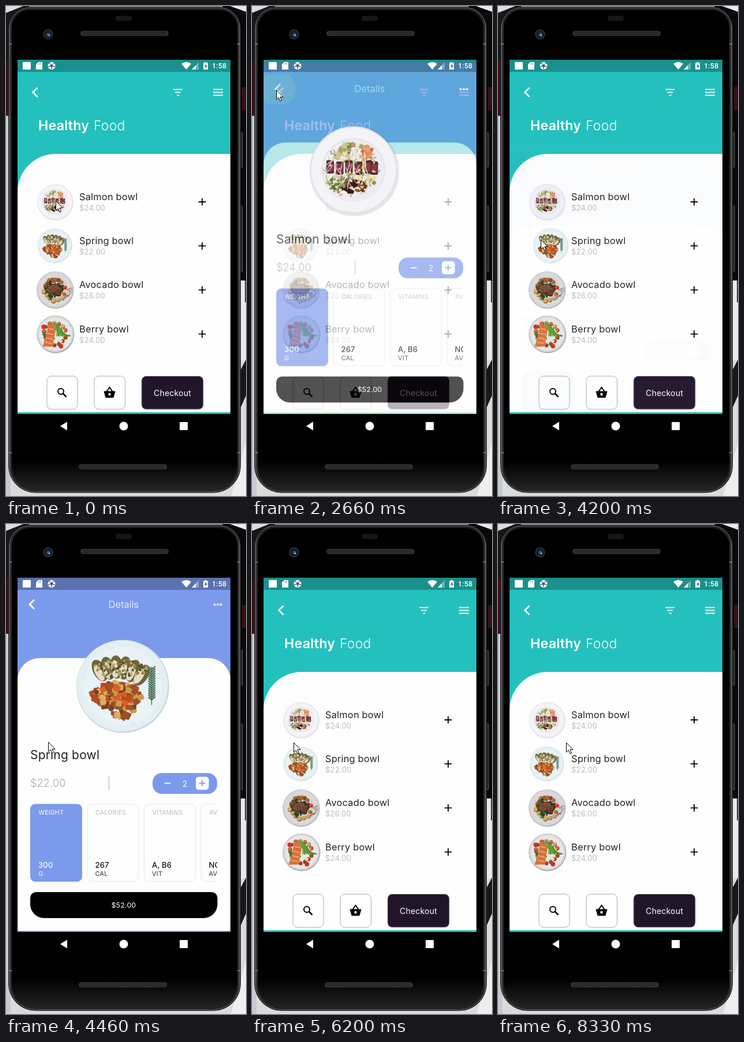
Recreate the animation shown at these times as an HTML page. Size 416 by 848 pixels, loop 8.73 s.

```html
<!DOCTYPE html>
<html lang="en">
<head>
<meta charset="utf-8">
<title>Food app</title>
<style>
  html, body { margin: 0; width: 100%; height: 100%; overflow: hidden; background: #ddd; }
  svg { display: block; width: 100%; height: 100%; }
  text { font-family: Inter, "Open Sans", sans-serif; letter-spacing: .2px; }
</style>
</head>
<body>
<svg id="stage" viewBox="0 0 416 848"></svg>
<script>
const LOOP = 8730, STEP = 200 / 3, DURATION = 300;
const TEAL = '#24c0bd', BLUE = '#7c9aec';
const stage = document.getElementById('stage');

// ---- SVG helpers ----
const rect = (x, y, w, h, fill, r = 0, extra = '') =>
  `<rect x="${x}" y="${y}" width="${w}" height="${h}" rx="${r}" fill="${fill}" ${extra}/>`;
const circle = (x, y, r, fill, extra = '') => `<circle cx="${x}" cy="${y}" r="${r}" fill="${fill}" ${extra}/>`;
const shape = (d, fill, extra = '') => `<path d="${d}" fill="${fill}" ${extra}/>`;
const line = (d, color, width = 2, extra = '') =>
  `<path d="${d}" fill="none" stroke="${color}" stroke-width="${width}" ${extra}/>`;
const text = (s, x, y, size, fill, weight = 400, anchor = 'start') =>
  `<text x="${x}" y="${y}" font-size="${size}" fill="${fill}" font-weight="${weight}" text-anchor="${anchor}">${s}</text>`;
const plus = (x, y, r, color) => line(`M${x - r} ${y}h${2 * r}M${x} ${y - r}v${2 * r}`, color, 1.8);
const outline = 'stroke="#aaa" stroke-width="1"';

// ---- Dishes, drawn on a plate of radius 100 ----
let seed = 7;
const random = () => (seed = (seed * 16807) % 2147483647) / 2147483647;
const pick = list => list[Math.floor(random() * list.length)];

function scatter(n, cx, cy, rx, ry, colors, w, h = w, round = w / 4) {
  let out = '';
  for (let i = 0; i < n; i++) {
    const a = random() * 6.283, d = Math.sqrt(random());
    const x = (cx + Math.cos(a) * rx * d).toFixed(1), y = (cy + Math.sin(a) * ry * d).toFixed(1);
    const k = .7 + random() * .6;
    out += rect(-w * k / 2, -h * k / 2, w * k, h * k, pick(colors), round,
      `transform="translate(${x} ${y}) rotate(${Math.floor(random() * 180)})"`);
  }
  return out;
}

function ring(n, r, from, to, colors, size) {
  let out = '';
  for (let i = 0; i < n; i++) {
    const a = (from + (to - from) * i / (n - 1)) * Math.PI / 180, d = r + random() * 10 - 5;
    const x = Math.cos(a) * d, y = Math.sin(a) * d, s = size * (.85 + random() * .3);
    out += circle(x, y, s, '#6b3f1c') + circle(x - 1, y - 1.5, s * .85, pick(colors));
  }
  return out;
}

function rosemary(x, y, height) {
  let d = '';
  for (let i = 0; i < height; i += 5) d += `M${x} ${y + i}l-7 -6M${x} ${y + i}l8 -7`;
  return line(`M${x} ${y - 6}v${height + 12}`, '#5f6f4c', 2) + line(d, '#4d7259', 3);
}

function salmonDish() {
  let out = circle(2, 3, 103, '#00000018') + circle(0, 0, 100, '#e3e3ea') + circle(0, 0, 97, '#f3f3f8') +
    circle(0, 0, 73, '#e6e5ec') + circle(0, 2, 70, '#eeedf2');
  out += scatter(300, -5, 0, 64, 62, ['#fff', '#efe6da', '#d9cdbb', '#c4b8a0', '#b5ad83'], 8, 3);
  out += scatter(60, 0, -36, 42, 24, ['#a5a957', '#cdc68c', '#7a8d45', '#e9e2d0', '#b99a72'], 8);
  out += scatter(35, 22, 16, 32, 26, ['#dcc95f', '#a0b04f', '#ebe0ad', '#8a9a48'], 10);
  out += scatter(16, 27, -42, 16, 14, ['#e58458', '#ee9d74', '#d9683f'], 11);
  [-62, -40, -19, 3, 26, 39].forEach((x, i) => {
    out += rect(x, -22 + i % 2 * 3, 17, 30, '#4b2a2a', 3) + rect(x + 2, -17 + i % 2 * 3, 13, 21, '#8b3a45', 2);
  });
  out += scatter(24, -8, 38, 36, 14, ['#3f1d14', '#6b3a20', '#94592e'], 15, 8);
  out += scatter(40, -38, 33, 22, 20, ['#5f7f3c', '#8da050', '#d9cdb5'], 6);
  for (let i = 0; i < 26; i++) {
    const x = random() * 90 - 55, y = random() * 60 - 45;
    out += line(`M${x} ${y}q${random() * 30 - 15} 10 ${random() * 36 - 18} ${20 + random() * 14}`, pick(['#f6eeee', '#e5c6cd', '#d3a5b3']), 1.6);
  }
  return out + scatter(50, -2, 3, 55, 50, ['#f4ece4', '#d8cdb8'], 4);
}

function springDish() {
  let out = circle(0, 0, 100, '#c9d8df') + circle(-1, -1, 98, '#e4eff4') + circle(0, 0, 84, '#e9f3f7');
  out += scatter(50, 0, 0, 88, 88, ['#c2d2da', '#d5e2e8'], 2);
  const cubes = ['#d95f28', '#cf9a4c', '#9a522a', '#dcae62', '#bf4a22', '#7b4222'];
  out += scatter(45, -13, 18, 50, 24, ['#6f3c20', '#8e4e28'], 13);
  out += scatter(110, -13, 20, 54, 26, cubes, 12) + scatter(30, -3, 50, 34, 17, cubes, 12);
  for (let i = 0; i < 6; i++) {
    out += `<g transform="translate(${-50 + i * 18} ${-34 - Math.sin(i / 5 * 3.14) * 12 + i * 2}) rotate(${-28 + i * 12})">` +
      `<ellipse rx="14" ry="25" fill="#6f6539"/><ellipse cx="-3" cy="4" rx="8.5" ry="19" fill="#e6dbc5"/></g>`;
  }
  out += scatter(110, -6, -38, 58, 20, ['#6d6838', '#94854a', '#504b28', '#b3a36c'], 5);
  return out + rosemary(62, -36, 70);
}

function avocadoDish() {
  let out = circle(1, 2, 100, '#999') + circle(0, 0, 99, '#d0ced0') + circle(0, 0, 92, '#dad8da') + circle(0, 0, 70, '#d0ced0');
  out += ring(9, 54, 165, 310, ['#9a602b', '#ad7035', '#85481f'], 12);
  out += ring(7, 57, 25, 170, ['#c8923f', '#ba8138', '#d8aa55'], 11.5);
  out += scatter(40, -6, 2, 50, 46, ['#35592a', '#4d7035', '#274b24', '#20371d'], 22, 11, 6);
  out += shape('M-50 0Q-40-30-5-32Q35-34 42-12Q38 4 30 34Q4 42-16 20Q-44 24-50 0Z', '#472a20');
  out += shape('M-46-2Q-35-26-5-28Q22-28 20-14Q4 12-16 16Q-42 18-46-2Z', '#83543f');
  out += shape('M0 16Q14-20 38-11Q33 14 26 28Q8 32 0 16Z', '#70422f');
  out += scatter(60, -10, -6, 34, 17, ['#9a6a52', '#6b3f2e', '#a87860', '#593325'], 7, 2.5);
  out += line('M-35-5l48-17M-30 5l45-18M-20 12l30-15M10 18l20-22M15 25l15-16', '#462318', 2);
  out += circle(55, -11, 10, '#d72a18') + circle(52, -14, 3, '#f58267');
  out += line('M62 0l32 -6M67 4l24 14M70 0l18 -14M75 6l20 0', '#56633a', 2.5);
  return out + line('M55 48q15-28 13-14q2 10 12-17M50 42q9-8 9-23', '#8c3c1d', 3.5);
}

function berryDish() {
  let out = circle(1, 2, 100, '#999') + circle(0, 0, 98, '#d3d3d6') + circle(0, 0, 89, '#e6e6e8');
  out += ring(14, 58, 20, 340, ['#c23820', '#dd6534', '#d9ae58', '#8e4a27'], 11);
  out += scatter(28, -8, 5, 54, 52, ['#d6a256', '#cc4728', '#4c742f', '#efdcad'], 15);
  out += shape('M-38-43L-5-52L0-10L-16 68L-68 68L-52 20Z', '#d7713f');
  out += line('M-35-28l30 5M-44-4l36 8M-50 20l38 8M-56 44l38 7', '#f1ad79', 5);
  for (let i = 0; i < 8; i++) out += line(`M${-12 + i * 6} ${-62 + i * 5}q${30 - i * 3} 35 ${20 + i * 4} ${72 - i * 5}`, i % 2 ? '#4c8a2e' : '#74ae42', 8, 'stroke-linecap="round"');
  return out + circle(-62, -38, 12, '#cf3522') + circle(30, 65, 12, '#c73420');
}

// Resting places: [x, y, radius] in the list and on the details page.
const dishes = [
  { name: 'Salmon bowl', price: '$24.00', draw: salmonDish, small: [85, 339, 30.5], large: [205, 282, 78.5] },
  { name: 'Spring bowl', price: '$22.00', draw: springDish, small: [84.5, 415, 30], large: [202.5, 281, 80.5] },
  { name: 'Avocado bowl', price: '$26.00', draw: avocadoDish, small: [85, 491, 32], large: [205, 280, 85] },
  { name: 'Berry bowl', price: '$24.00', draw: berryDish, small: [85.5, 567.5, 32.5], large: [205, 281, 85] }
];
const place = ([x, y, r]) => `translate(${x} ${y}) scale(${r / 100})`;

// ---- Pages ----
function listPage() {
  const rows = dishes.map((dish, i) => {
    const y = 339 + i * 76.2;
    return `<use id="plate${i}" href="#dish${i}" transform="${place(dish.small)}"/>` +
      text(dish.name, 127, y - 3, 16.4, '#222') + text(dish.price, 127, y + 15, 13.2, '#aaa', 300) + plus(340, y, 6.3, '#000');
  }).join('');
  return rect(20, 93, 369, 613, TEAL) + shape('M20 703V322A66 66 0 0 1 86 256H389V703Z', '#fefefe') +
    line('M54.5 141.5l-8 7.8l8 7.8', '#fff', 2.7) +
    line('M290 144.5h16M293 149.5h10M296.500 154.500h4M359 144.500h17M359 149.500h17M359 154.500h17', '#e8f8f8', 1.9) +
    text('Healthy', 56, 215, 23.2, '#fff', 600) + text('Food', 152, 215, 23, '#fff', 300) + rows +
    rect(71, 640.5, 53, 57.5, '#fff', 8, outline) + rect(153, 640.5, 53.5, 57.5, '#fff', 8, outline) +
    rect(235, 640.5, 107, 57.5, '#22152a', 8, outline) + text('Checkout', 288.5, 674.5, 14, '#fff', 400, 'middle') +
    circle(95, 667, 5, 'none', 'stroke="#000" stroke-width="2"') + line('M98.500 670.500l6 6', '#000', 2.5) +
    shape('M170 667h19l-3 10.500h-13Z', '#000', 'stroke="#000" stroke-linejoin="round"') +
    line('M174.500 667l5-7l5 7', '#000', 2) + circle(179.500, 672, 2.200, '#fff');
}

function detailsPage() {
  const cards = [['WEIGHT', '300', 'G'], ['CALORIES', '267', 'CAL'], ['VITAMINS', 'A, B6', 'VIT'], ['AVAILABLE', 'NO', 'AV']]
    .map(([label, value, unit], i) => {
      const x = 42.5 + i * 98.5, on = i === 0;
      return rect(x, 485, 89, 133.5, on ? BLUE : '#fefefe', 8, `stroke="${on ? BLUE : '#e6e6e6'}"`) +
        text(label, x + 14, 503, 10.6, on ? '#fff' : '#bbb') +
        text(value, x + 13.5, 595, 13, on ? '#fff' : '#111', 500) + text(unit, x + 13.5, 608.5, 11, on ? '#fff' : '#333');
    }).join('');
  return rect(20, 93, 369, 613, BLUE) + shape('M20 704V270A38 38 0 0 1 58 232H351A38 38 0 0 1 389 270V704Z', '#fefefe') +
    `<g clip-path="url(#bar)">${circle(45, 139, 31, '#c8c8c8', 'id="ripple"')}</g>` +
    line('M49 131l-8 8l8 8', '#fff', 3) + text('Details', 204, 145, 16.5, '#fff', 300, 'middle') +
    [361.5, 367, 372.5].map(x => circle(x, 139.5, 2, '#fff')).join('') +
    `<g id="name">${text('', 42, 407, 21, '#222')}</g><g id="price">${text('', 42, 455, 18, '#aaa', 300)}</g>` +
    line('M178.500 437v23', '#aaa', 1) + rect(254, 431, 112, 36, BLUE, 16) + line('M274.500 448.700h11', '#fff', 1.800) +
    text('2', 310, 454.5, 14, '#fff', 400, 'middle') + rect(329, 437.5, 22.5, 22.5, '#fff', 5) + plus(340, 448.7, 5.5, BLUE) +
    `<g clip-path="url(#cards)">${cards}</g>` +
    shape('M52 637H356.500A10 10 0 0 1 366.500 647V658A24 24 0 0 1 342.500 682H66A24 24 0 0 1 42 658V647A10 10 0 0 1 52 637Z', '#000') +
    text('$52.00', 204, 664, 12.3, '#fff', 400, 'middle');
}

const statusBar = rect(20, 93, 369, 21, '#000', 0, 'fill-opacity=".26"') + rect(29, 97, 14, 13, '#fff', 1) +
  shape('M56 97h7v13h-11v-9Z', '#fff') + line('M57 98.500v3M59.500 98.500v3', '#777', 1) +
  circle(79, 103.5, 6.5, '#fff') + circle(79, 103.5, 2.4, '#456') +
  line('M75 99l2 2M83 99l-2 2M79 106v3M73.500 105l3-1M84.500 105l-3-1', '#456', 1.500) +
  shape('M304 100Q312.500 94 321 100L312.500 110Z', '#fff') + shape('M334 97v13h-12Z', '#fff', 'fill-opacity=".35"') +
  shape('M329 102.500v7.500h-7Z', '#fff') + shape('M344.500 97h3v1.500h2.500v11.500h-8v-11.500h2.500Z', '#fff') + shape('M347 100l-3 5h2v3l3-5h-2Z', '#566') +
  `<text x="357" y="108.300" font-size="12.500" fill="#fff" font-weight="500" style="font-family:Roboto,sans-serif">1:58</text>`;

const speaker = (x, y) => rect(x, y, 153, 9, '#303030', 4.5) +
  line(`M${x + 5} ${y + 3}h143M${x + 5} ${y + 6}h143`, '#111', 1, 'stroke-dasharray="2 1"');

const surroundings = rect(0, 0, 416, 848, '#d9dbdd') + rect(0, 0, 40, 95, '#16171b') + rect(0, 95, 12, 95, '#3b1116') +
  shape('M0 12l30-12h-30Z', '#ddd') + rect(0, 190, 8, 658, '#c6cacf') + rect(375, 0, 41, 475, '#08080a') +
  shape('M388 0h28v10Z', '#e9e9ec') + rect(409, 140, 7, 40, '#371016') + rect(405, 475, 11, 138, '#e8eaee') +
  line('M415 475v38', '#111', 1.500) + shape('M416 612v62l-16 36v-68Z', '#17181b') + shape('M416 755l-26 93h26Z', '#eee');

// Phone outline inset from the body edge; the lower corners are rounder.
function body(inset) {
  const l = 4 + inset, r = 407 - inset, t = 1 + inset, b = 842.5 - inset, top = 37 - inset, low = 47 - inset;
  return `M${l} ${t + top}A${top} ${top} 0 0 1 ${l + top} ${t}H${r - top}A${top} ${top} 0 0 1 ${r} ${t + top}` +
    `V${b - low}A${low} ${low} 0 0 1 ${r - low} ${b}H${l + low}A${low} ${low} 0 0 1 ${l} ${b - low}Z`;
}

const phone = rect(405, 219, 5, 60, '#25262a', 1, 'stroke="#555"') + rect(405, 346, 5, 114, '#25262a', 1, 'stroke="#555"') +
  shape(body(.5), 'url(#rim)', 'stroke="#151515"') + line(body(2), '#666', 1) + shape(body(6), 'url(#face)') +
  line('M5 66h5M401 66h5M5 773h5M401 773h5', '#777', 2) +
  rect(190, 17, 28, 9, '#17171a', 4) + speaker(129, 43) + speaker(126, 793) +
  circle(73, 49, 9, '#27282c') + circle(73, 49, 6, '#111a2b') + circle(73.5, 49.5, 3, '#315b91') + circle(75, 51, 1.2, '#a9cff5');

stage.innerHTML = `<defs>
  <linearGradient id="rim"><stop stop-color="#555"/><stop offset=".012" stop-color="#222"/><stop offset=".988" stop-color="#222"/><stop offset="1" stop-color="#555"/></linearGradient>
  <linearGradient id="face" x1="0" y1="0" x2="0" y2="1"><stop/><stop offset=".94"/><stop offset="1" stop-color="#232323"/></linearGradient>
  <clipPath id="screen">${rect(20, 93, 369, 613, '#000')}</clipPath>
  <clipPath id="bar">${rect(20, 114, 369, 52, '#000')}</clipPath>
  <clipPath id="cards">${rect(42, 480, 324, 145, '#000')}</clipPath>
  ${dishes.map((dish, i) => `<g id="dish${i}">${dish.draw()}</g>`).join('')}
</defs>${surroundings}${phone}${rect(20, 706, 369, 44, '#000')}
<g clip-path="url(#screen)">${listPage()}<g id="details">${detailsPage()}</g><use id="hero"/>${statusBar}</g>
${shape('M94 727l12-7.500v15Z', '#fff')}${circle(204, 727, 7.5, '#fff')}${rect(301, 720, 14, 14, '#fff', 1)}
${shape('M0 0V16.500L3.800 13L6.400 19L9 18L6.400 12H11.500Z', '#fff', 'id="cursor" stroke="#000" stroke-linejoin="round"')}`;

const el = id => document.getElementById(id);
const details = el('details'), hero = el('hero'), ripple = el('ripple'), cursor = el('cursor');
const nameText = el('name').firstChild, priceText = el('price').firstChild;

// ---- Motion ----
const clamp = v => Math.min(1, Math.max(0, v));

function bezier(x1, y1, x2, y2) {
  const at = (a, b, u) => 3 * a * u * (1 - u) ** 2 + 3 * b * u * u * (1 - u) + u ** 3;
  return x => {
    if (x <= 0 || x >= 1) return clamp(x);
    let low = 0, high = 1;
    for (let i = 0; i < 24; i++) {
      const mid = (low + high) / 2;
      if (at(x1, x2, mid) < x) low = mid; else high = mid;
    }
    return at(y1, y2, low);
  };
}
const fastOutSlowIn = bezier(.4, 0, .2, 1), easeIn = bezier(.42, 0, 1, 1);

const visits = [
  { dish: 0, open: 910, press: 2510, close: 2603 },
  { dish: 1, open: 4165, press: 5440, close: 5540 },
  { dish: 2, open: 6700, press: 7910, close: 8003 }
];

// Pointer stops: time, x, y
const pointer = [
  [0, 86, 337], [1400, 86, 337], [1467, 86, 332], [1800, 70, 230], [2067, 37, 111], [2200, 42, 145],
  [2800, 42, 145], [3400, 79, 391], [3800, 74, 404], [4400, 74, 404], [5067, 64, 130], [5267, 55, 143],
  [5750, 55, 143], [6400, 80, 482], [6860, 80, 482], [7000, 123, 465], [7600, 56, 143], [7733, 52, 141],
  [8050, 52, 141], [8333, 118, 378], [LOOP, 118, 378]
];

function pointerAt(t) {
  const i = Math.max(1, pointer.findIndex(stop => stop[0] >= t));
  const [t0, x0, y0] = pointer[i - 1], [t1, x1, y1] = pointer[i];
  const k = clamp((t - t0) / (t1 - t0));
  return [x0 + (x1 - x0) * k, y0 + (y1 - y0) * k];
}

// The plate flies on an arc that leaves horizontally.
function flight(from, to, p) {
  const a = p * Math.PI / 2;
  return [
    from[0] + (to[0] - from[0]) * Math.sin(a),
    from[1] + (to[1] - from[1]) * (1 - Math.cos(a)),
    from[2] + (to[2] - from[2]) * p ** 1.5
  ];
}

function render(t) {
  const visit = visits.find(v => t > v.open && t < v.close + DURATION);
  const display = visit ? '' : 'none';
  details.style.display = hero.style.display = display;
  dishes.forEach((_, i) => { el('plate' + i).style.display = visit && visit.dish === i ? 'none' : ''; });
  if (visit) {
    const dish = dishes[visit.dish], closing = t > visit.close;
    const progress = clamp((t - (closing ? visit.close : visit.open)) / DURATION);
    const shown = closing ? 1 - progress : progress;
    details.setAttribute('opacity', easeIn(shown));
    details.setAttribute('transform', `translate(0 ${153 * (1 - fastOutSlowIn(shown))})`);
    const [from, to] = closing ? [dish.large, dish.small] : [dish.small, dish.large];
    hero.setAttribute('href', '#dish' + visit.dish);
    hero.setAttribute('transform', place(flight(from, to, fastOutSlowIn(progress))));
    nameText.textContent = dish.name;
    priceText.textContent = dish.price;
    const held = Math.max(0, t - visit.press);
    ripple.setAttribute('r', Math.min(31, 16 + held * .2));
    ripple.setAttribute('fill-opacity', Math.min(.3, held * .0018));
  }
  cursor.setAttribute('transform', `translate(${pointerAt(t).map(v => Math.round(v) + .5).join(' ')})`);
}

function tick() {
  const t = performance.now() % LOOP;
  render(Math.floor((t + 8) / STEP) * STEP);
  requestAnimationFrame(tick);
}
tick();
</script>
</body>
</html>
```
